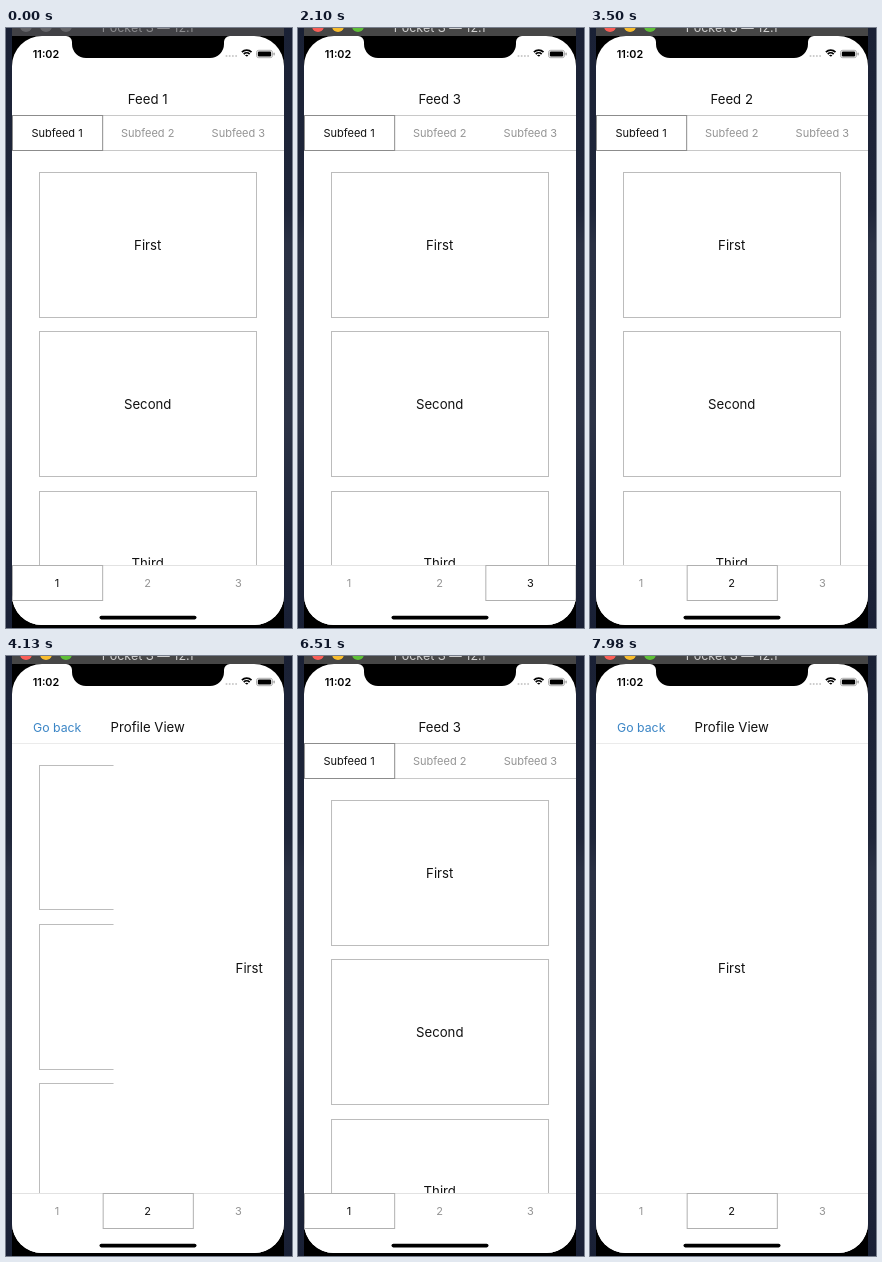
Recreate the animation shown at these times as an HTML page with a canvas. Size 286x600 px, loop 8000 ms.

```html
<!DOCTYPE html>
<html lang="en">
<head>
<meta charset="utf-8">
<title>Nested tab navigation</title>
<style>
  html, body { margin: 0; width: 100%; height: 100%; overflow: hidden; background: #1c2235; }
  canvas { display: block; width: 286px; height: 600px; }
</style>
</head>
<body>
<canvas id="stage"></canvas>
<script>
const W = 286, H = 600, LOOP = 8000;
const LEFT = 6, RIGHT = 278, TOP = 8, BOTTOM = 597, MID = 141.7;
const PAGE = RIGHT - LEFT, TAB = PAGE / 3;
const FOCUS_AT = 980, PUSH_AT = 4015;
const visits = [
  { at: -2000, tab: 1 }, { at: 1045, tab: 3, fresh: true }, { at: 2500, tab: 2 },
  { at: 5599, tab: 3 }, { at: 6510, tab: 1 }, { at: 7450, tab: 2 }
];

const canvas = document.getElementById('stage');
const ctx = canvas.getContext('2d');
const scale = window.devicePixelRatio || 1;
canvas.width = W * scale;
canvas.height = H * scale;

// Remaining distance (1 to 0) of an underdamped spring after ms.
function spring(ms) {
  if (ms <= 0) return 1;
  const s = ms / 1000, a = 10.45 * s;
  return Math.exp(-11 * s) * (Math.cos(a) + 1.053 * Math.sin(a));
}

function fill(color, x, y, w, h) {
  ctx.fillStyle = color;
  ctx.fillRect(x, y, w, h);
}

function pill(color, x, y, w, h, r) {
  ctx.fillStyle = color;
  ctx.beginPath();
  ctx.roundRect(x, y, w, h, r);
  ctx.fill();
}

function outline(color, x, y, w, h) {
  ctx.strokeStyle = color;
  ctx.lineWidth = 1;
  ctx.strokeRect(x, y, w, h);
}

function text(str, x, y, size, color = '#111', weight = 400) {
  ctx.font = `${weight} ${size}px Inter, Roboto, sans-serif`;
  ctx.textAlign = 'center';
  ctx.textBaseline = 'alphabetic';
  ctx.fillStyle = color;
  ctx.fillText(str, x, y + size * 0.36);
}

function tabs(y, prefix, active, border) {
  for (let i = 0; i < 3; i++) {
    const on = i + 1 === active, x = LEFT + i * TAB;
    if (on) outline(border, x + 0.5, y + 0.5, TAB - 0.5, 35);
    text(prefix + (i + 1), x + TAB / 2 - 0.3, y + 18.2, 11, on ? '#111' : '#949494');
  }
}

function cards(top) {
  ['First', 'Second', 'Third'].forEach((label, i) => {
    const y = top + i * 159.3, upper = Math.round(y), lower = Math.round(y + 144.6);
    outline('#bcbcbc', 33.5, upper + 0.5, 217, lower - upper);
    text(label, MID, y + 73, 13.2);
  });
}

function feed(tab, contentX) {
  text('Feed ' + tab, MID, 71.5, 13.2);
  fill('#c8c8c8', LEFT, 87, PAGE, 1);
  fill('#c8c8c8', LEFT, 122, PAGE, 1);
  tabs(87, 'Subfeed ', 1, '#8c8c8c');
  ctx.save();
  ctx.translate(contentX, 0);
  cards(144);
  ctx.restore();
}

function profile(x) {
  if (x > 0.5) cards(108.6);
  fill('#fff', LEFT + x, 88, PAGE, 460);
  text('First', MID + x, 312.7, 13.2);
  text('Go back', 51.2, 71.5, 12.3, '#3c86c6');
  text('Profile View', MID, 71.5, 13.2);
  fill('#ebebeb', LEFT, 87, PAGE, 1);
}

function page(tab, x, t, contentX = 0) {
  ctx.save();
  ctx.translate(x, 0);
  ctx.beginPath();
  ctx.rect(LEFT, 0, PAGE, H);
  ctx.clip();
  if (tab === 2 && t >= PUSH_AT) profile(PAGE * spring(t - PUSH_AT));
  else feed(tab, contentX);
  ctx.restore();
}

function desktop(focused) {
  const sky = ctx.createLinearGradient(0, 0, 0, H);
  [[0, '#1a2135'], [0.3, '#1f263a'], [0.36, '#2a3144'], [0.65, '#2c3346'], [0.84, '#1f263b'], [1, '#192035']]
    .forEach(([stop, color]) => sky.addColorStop(stop, color));
  fill(sky, 0, 0, W, H);
  fill('#000', LEFT, TOP, PAGE, H - TOP);
  fill(focused ? '#464646' : '#414145', LEFT, 0, PAGE, TOP);
  const lights = focused ? ['#fb5f57', '#f9bd2e', '#5fc038'] : ['#646468', '#646468', '#646468'];
  lights.forEach((color, i) => pill(color, 14 + i * 20, -8, 12, 12, 6));
  text('Pocket S — 12.1', MID, -1, 12.5, focused ? '#d0d0d0' : '#8b8b8e');
}

function notch() {
  const left = 66, right = 218, bottom = 30, r = 14, flare = 6;
  ctx.fillStyle = '#000';
  ctx.beginPath();
  ctx.moveTo(left - flare, TOP);
  ctx.arcTo(left, TOP, left, TOP + flare, flare);
  ctx.arcTo(left, bottom, left + r, bottom, r);
  ctx.arcTo(right, bottom, right, bottom - r, r);
  ctx.arcTo(right, TOP, right + flare, TOP, flare);
  ctx.fill();
}

function statusBar() {
  text('11:02', 40, 26, 10.8, '#000', 600);
  for (let i = 0; i < 4; i++) pill('#c8c8c8', 219.5 + i * 3.2, 27, 2, 2, 1);
  ctx.strokeStyle = '#000';
  ctx.lineWidth = 1.7;
  [6.8, 4.2, 1.5].forEach(r => {
    ctx.beginPath();
    ctx.arc(240.7, 29, r, -Math.PI * 0.75, -Math.PI * 0.25);
    ctx.stroke();
  });
  ctx.strokeStyle = '#999';
  ctx.lineWidth = 0.8;
  ctx.beginPath();
  ctx.roundRect(250.5, 22.3, 16, 7.4, 2.2);
  ctx.stroke();
  pill('#000', 251.8, 23.5, 13.4, 5, 1.2);
  pill('#999', 267.5, 24.6, 1.2, 2.8, 0.6);
}

function draw(t) {
  ctx.setTransform(scale, 0, 0, scale, 0, 0);
  desktop(t >= FOCUS_AT);

  ctx.save();
  ctx.beginPath();
  ctx.roundRect(LEFT, TOP, PAGE, BOTTOM - TOP, 30);
  ctx.clip();
  fill('#fff', LEFT, TOP, PAGE, BOTTOM - TOP);

  const index = visits.findLastIndex(v => t >= v.at);
  const now = visits[index], before = visits[index - 1];
  const elapsed = t - now.at;
  const dir = before ? Math.sign(now.tab - before.tab) : 0;
  const x = dir * PAGE * spring(elapsed);
  if (before && Math.abs(x) > 0.1) page(before.tab, x - dir * PAGE, t);
  // A newly opened feed also slides its own content in, slightly later.
  page(now.tab, x, t, now.fresh ? PAGE * spring(elapsed - 16) : 0);

  fill('#fff', LEFT, 537, PAGE, 60);
  fill('#e2e2e2', LEFT, 537, PAGE, 1);
  tabs(537, '', now.tab, '#b0b0b0');
  pill('#000', 93.5, 587.8, 97, 3.6, 1.8);
  statusBar();
  ctx.restore();
  notch();
}

const start = performance.now();
function tick() {
  draw((performance.now() - start) % LOOP);
  requestAnimationFrame(tick);
}
tick();
</script>
</body>
</html>
```
